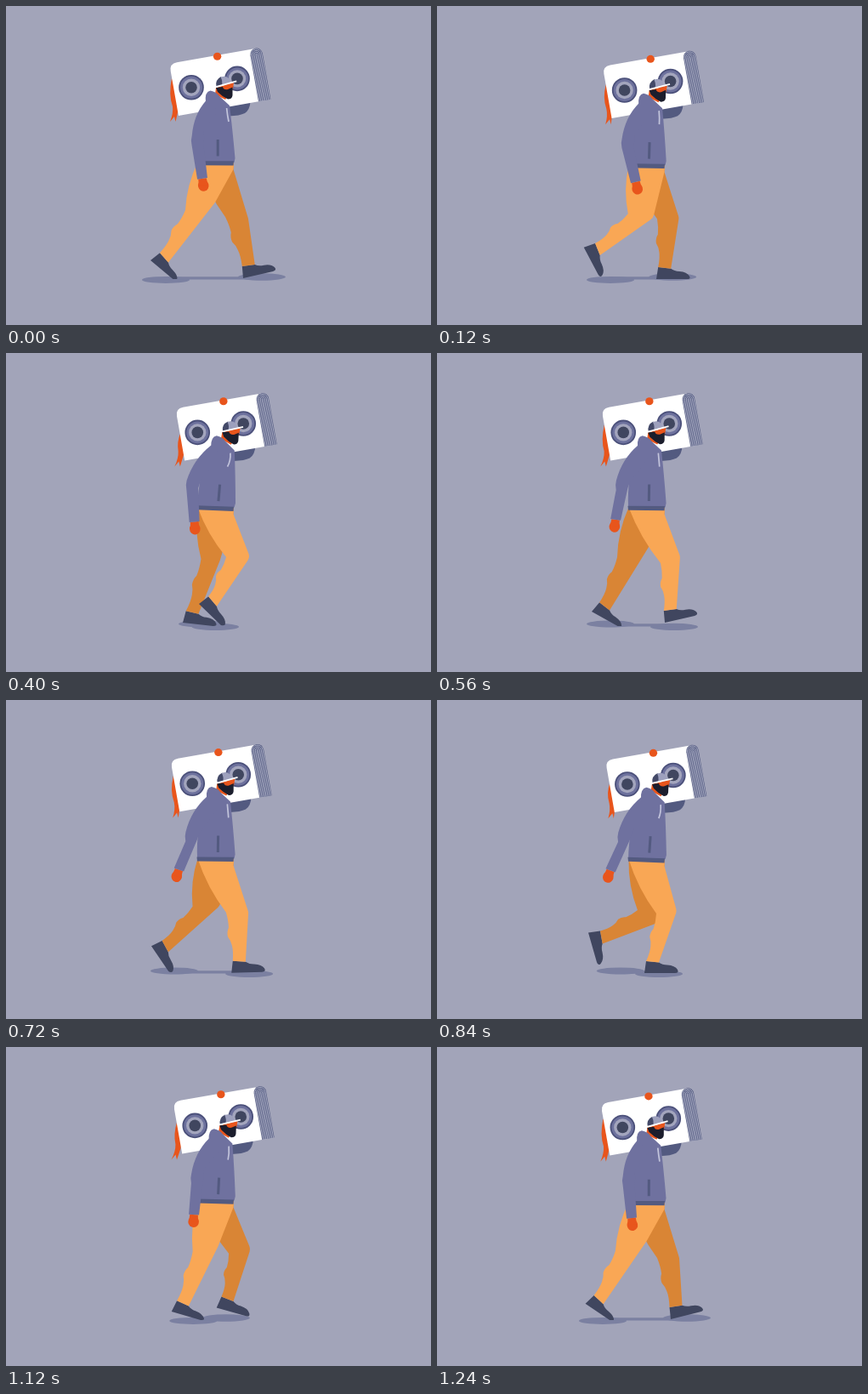
An HTML page with a canvas that plays this animation: 500 by 375 pixels, repeating every 1280 ms.

```html
<!DOCTYPE html>
<html lang="en">
<head>
<meta charset="utf-8">
<title>Walk cycle</title>
<style>
  html, body { margin: 0; width: 100%; height: 100%; overflow: hidden; background: #a2a4b9; }
  canvas { display: block; width: 500px; height: 375px; }
</style>
</head>
<body>
<canvas id="stage" width="500" height="375"></canvas>
<script>
const ctx = document.getElementById('stage').getContext('2d');
const LOOP = 1280, STEP = 640, TICK = 40, GROUND = 321, TAU = Math.PI * 2;
const C = {
  bg: '#a2a4b9', shadow: '#7b80a1', near: '#f9a755', far: '#d98535', skin: '#e8551c',
  coat: '#6f719f', trim: '#535a80', shoe: '#40465f', ink: '#1c1e2d', navy: '#434968', pale: '#c3c5dc'
};

// Leg poses from heel strike: time, knee front x/y, knee back x/y, heel x/y, sole angle
const LEG = [
  [0, 285, 250, 258, 248, 279, 320, -13],
  [100, 285, 249, 259, 250, 261.5, 321, 0],
  [200, 282, 248, 258, 251, 244, 321, 0],
  [240, 279, 248, 254, 253, 236.5, 321, 0],
  [400, 252, 243, 229.5, 242, 208, 317, 7],
  [560, 249, 228, 212, 240, 182, 304, 32],
  [640, 246, 231, 211, 240, 170, 299, 43],
  [840, 262, 261, 236, 247, 178, 273.5, 74],
  [880, 271, 261, 245, 246, 188, 271, 74],
  [1040, 287, 240, 259, 240, 227, 295, 44],
  [1200, 286, 239, 263, 247, 268, 317, -13],
  [1240, 285, 248, 259, 248, 275, 320, -14]
];
// Shadow extent: time, left, right
const SHADE = [[0, 160, 329], [220, 190, 286], [400, 203, 274], [560, 176, 307], [600, 167, 322]];

// Smooth periodic interpolation through keyed rows
function sample(keys, period, t) {
  const n = keys.length;
  const at = i => {
    const lap = Math.floor(i / n), row = keys[i - lap * n];
    return [row[0] + lap * period, ...row.slice(1)];
  };
  let i = n - 1;
  while (keys[i][0] > t) i--;
  const [a, b, c, d] = [at(i - 1), at(i), at(i + 1), at(i + 2)];
  const h = c[0] - b[0], s = (t - b[0]) / h, s2 = s * s, s3 = s2 * s;
  return b.slice(1).map((v, k) => {
    const j = k + 1;
    const m0 = (c[j] - a[j]) / (c[0] - a[0]) * h;
    const m1 = (d[j] - b[j]) / (d[0] - b[0]) * h;
    return (2 * s3 - 3 * s2 + 1) * v + (s3 - 2 * s2 + s) * m0 + (3 * s2 - 2 * s3) * c[j] + (s3 - s2) * m1;
  });
}

function fill(color, trace) {
  ctx.beginPath();
  trace();
  ctx.fillStyle = color;
  ctx.fill();
}
const paint = (color, d) => { ctx.fillStyle = color; ctx.fill(new Path2D(d)); };
function line(color, width, d) {
  ctx.strokeStyle = color;
  ctx.lineWidth = width;
  ctx.stroke(new Path2D(d));
}
const oval = (color, x, y, rx, ry = rx, turn = 0) =>
  fill(color, () => ctx.ellipse(x, y, rx, ry, turn, 0, TAU));
function moved(x, y, draw) {
  ctx.save();
  ctx.translate(x, y);
  draw();
  ctx.restore();
}

// The near foot's shade lies lower than the far one's
function shadow(t) {
  const [l, r] = sample(SHADE, STEP, t % STEP), rx = Math.min(28, (r - l) * 0.39);
  const tilt = 1.7 * Math.max(-1, Math.min(1, 5 * Math.cos(TAU * t / LOOP)));
  oval(C.shadow, l + rx, 320.2 + tilt, rx, 4);
  oval(C.shadow, r - rx, 320.2 - tilt, rx, 4.2);
  fill(C.shadow, () => ctx.rect(l + rx, 318.2, r - l - 2 * rx, 3.4));
}

function leg(color, u, dy) {
  const [fx, fy, kx, ky, hx, hy, deg] = sample(LEG, LOOP, u);
  const a = deg * Math.PI / 180, cos = Math.cos(a), sin = Math.sin(a);
  const foot = (x, y) => [hx + x * cos - y * sin, Math.min(GROUND, hy + x * sin + y * cos)];
  const back = foot(2, -14), front = foot(17, -12.5);

  fill(C.shoe, () => {
    ctx.moveTo(...foot(0, 0));
    ctx.lineTo(...back);
    ctx.lineTo(...front);
    ctx.quadraticCurveTo(...foot(21, -9.5), ...foot(27, -9.5));
    ctx.quadraticCurveTo(...foot(36, -9), ...foot(39, -4));
    ctx.quadraticCurveTo(...foot(41, 0), ...foot(36, 0));
  });

  // Point at fraction f from (x, y) towards (x2, y2), pushed sideways by off
  const along = (x, y, x2, y2) => {
    const dx = x2 - x, h = y2 - y, len = Math.hypot(dx, h);
    return (f, off) => [x + dx * f + h / len * off, y + h * f - dx / len * off];
  };
  const calf = along(kx, ky, ...back), thigh = along(225.5, 184 + dy, kx, ky);
  fill(color, () => {
    ctx.moveTo(225.5, 184 + dy);
    ctx.lineTo(268, 184 + dy);
    ctx.lineTo(267.5, 192 + dy);
    ctx.arcTo(fx, fy, ...front, 9);
    ctx.lineTo(...front);
    ctx.lineTo(...back);
    ctx.quadraticCurveTo(...calf(0.8, 2.5), ...calf(0.68, 1.5));
    ctx.quadraticCurveTo(...calf(0.58, 1), ...calf(0.5, -1.8));
    ctx.quadraticCurveTo(...calf(0.4, -2.5), ...calf(0.32, 0.5));
    ctx.quadraticCurveTo(...calf(0.18, 1.5), kx, ky);
    ctx.quadraticCurveTo(...thigh(0.5, -6), 225.5, 184 + dy);
  });
}

function book(dx, sway) {
  const s = sway, x = 195 + dx * 0.45, y = 85 + dx * 1.5;
  paint(C.skin, `M${x} ${y}Q${191 + dx * 0.35} ${104 + dx * 0.4} ${196 + s * 0.3} 118` +
    `Q${197 + s * 0.6} 126 ${193 + s} 136L${198 + s} 130L${199.5 + s} 136Q${203 + s * 0.5} 124 204 110Z`);
  ctx.save();
  ctx.translate(297, 112.3);
  ctx.rotate(-Math.PI / 18);
  paint('#fff', 'M-95.5 0V-53Q-95.5 -62 -86.5 -62H7V0Z');
  paint(C.trim, 'M0 0V-55A7.3 7.3 0 0 1 14.6 -55V0Z');
  for (let i = 1.1; i < 7; i += 1.8) {
    const r = 7.3 - i;
    line('#bcbfd2', 0.75, `M${i} 0V-55A${r} ${r} 0 0 1 ${14.6 - i} -55V0`);
  }
  ctx.restore();
  for (const [x, y] of [[218, 95.8], [272, 85.4]]) {
    oval('#4b507a', x, y, 14.8);
    oval('#6d719d', x, y, 13);
    oval('#a3a5bd', x, y, 10.2);
    oval(C.shoe, x, y, 6.8);
  }
  oval(C.skin, 248.6, 59.2, 4.7, 4.5);
}

function head() {
  paint(C.skin, 'M247 96L268 90L267 97L258 110L246 104Z');
  paint(C.ink, 'M247 96L255 95Q256 99 261 98L266.5 95.5L266.5 105Q266 109.5 261 109.5Q255 107 249 101Z');
  paint(C.navy, 'M247.5 95Q245.5 87 253 83L257 92Z');
  paint('#9da0bd', 'M252.5 83.6Q259 81 262.5 85.5L264 91L254 93.5Q255 88 252.5 83.6Z');
  line('#fff', 1.8, 'M246.8 95.2L271.2 88.4');
}

function torso(dx, dy) {
  const at = (x, y) => `${x + dx * (185 - y) / 85} ${y + dy} `;
  paint(C.coat, 'M' + at(235, 113) + 'Q' + at(233.5, 101) + at(240.5, 99.6) + 'Q' + at(247.5, 101) + at(251, 106) +
    'L' + at(263, 117) + 'Q' + at(266.5, 145) + at(269.5, 179) + 'L' + at(268.5, 184) + 'L' + at(225, 183) +
    'Q' + at(224, 168) + at(226, 148) + 'Z');
  const l = 182.3 + dy - dx * 0.1, r = 182.3 + dy + dx * 0.13;
  paint(C.trim, `M224.5 ${l}L268 ${r}L267.5 ${r + 5.2}L225 ${l + 5}Z`);
  line(C.trim, 3, 'M' + at(249.2, 157) + 'L' + at(249.2, 176.5));
  line(C.pale, 1.7, `M${259.6 + dx * 0.6} ${120 + dy}Q${260.5 + dx * 0.55} ${129 + dy} ${262 - dx * 0.2} ${136 + dy}`);
}

function arm(t, dx, dy) {
  const swing = Math.cos(TAU * (t - 130) / LOOP), bend = Math.cos(TAU * (t + 40) / LOOP);
  const hx = 218 + 17.7 * swing, hy = 208 + 3.5 * swing + dy;
  const ex = 214.3 + 4 * bend, ey = 157.5 + dy;
  const sx = 235.5 + dx * 0.8, sy = 111 + dy;
  const vx = hx - ex - 6, vy = hy - ey, len = Math.hypot(vx, vy), ux = vx / len, uy = vy / len;
  const cx = hx - ux * 8, cy = hy - uy * 8;
  oval(C.skin, hx, hy + 0.3, 6.3, 6.7, -0.3 * swing);
  fill(C.skin, () => {
    ctx.moveTo(cx - 4.8 * uy, cy + 4.8 * ux);
    ctx.lineTo(cx + 4.8 * uy, cy - 4.8 * ux);
    ctx.lineTo(hx + 5.4 * uy, hy - 5.4 * ux);
    ctx.lineTo(hx - 5.4 * uy, hy + 5.4 * ux);
  });
  fill(C.coat, () => {
    ctx.moveTo(sx, sy);
    ctx.quadraticCurveTo((sx + ex) / 2 - 6, (sy + ey) / 2 - 7, ex + 0.5, ey - 5);
    ctx.quadraticCurveTo(ex - 1, ey, ex + 0.3, ey + 6);
    ctx.lineTo(cx - 6 * uy, cy + 6 * ux);
    ctx.lineTo(cx + 6 * uy, cy - 6 * ux);
    ctx.lineTo(ex + 14, ey + 4);
    ctx.quadraticCurveTo(ex + 16, ey - 4, 232, 148 + dy);
    ctx.lineTo(sx + 14, sy + 12);
  });
}

function draw(t) {
  const w = TAU * t / STEP;
  const dx = 4.25 * (1 - Math.cos(w)), dy = 3.4 * Math.sin(w);
  ctx.fillStyle = C.bg;
  ctx.fillRect(0, 0, 500, 375);
  shadow(t);
  leg(C.far, t, dy);
  leg(C.near, (t + STEP) % LOOP, dy);
  moved(dx * 0.8, dy, () => paint(C.trim, 'M258 116L287.5 112Q287 122 281 126Q275 129 262 129.5Z'));
  moved(dx, dy, () => book(dx, dy * 0.8));
  moved(256 + dx, 98 + dy, () => {
    ctx.rotate(dx * 0.008);
    ctx.translate(-256, -98);
    head();
  });
  torso(dx, dy);
  arm(t, dx, dy);
}

function tick() {
  const t = (performance.now() + 0.5) % LOOP;
  draw(Math.floor(t / TICK) * TICK);
  requestAnimationFrame(tick);
}
tick();
</script>
</body>
</html>
```
